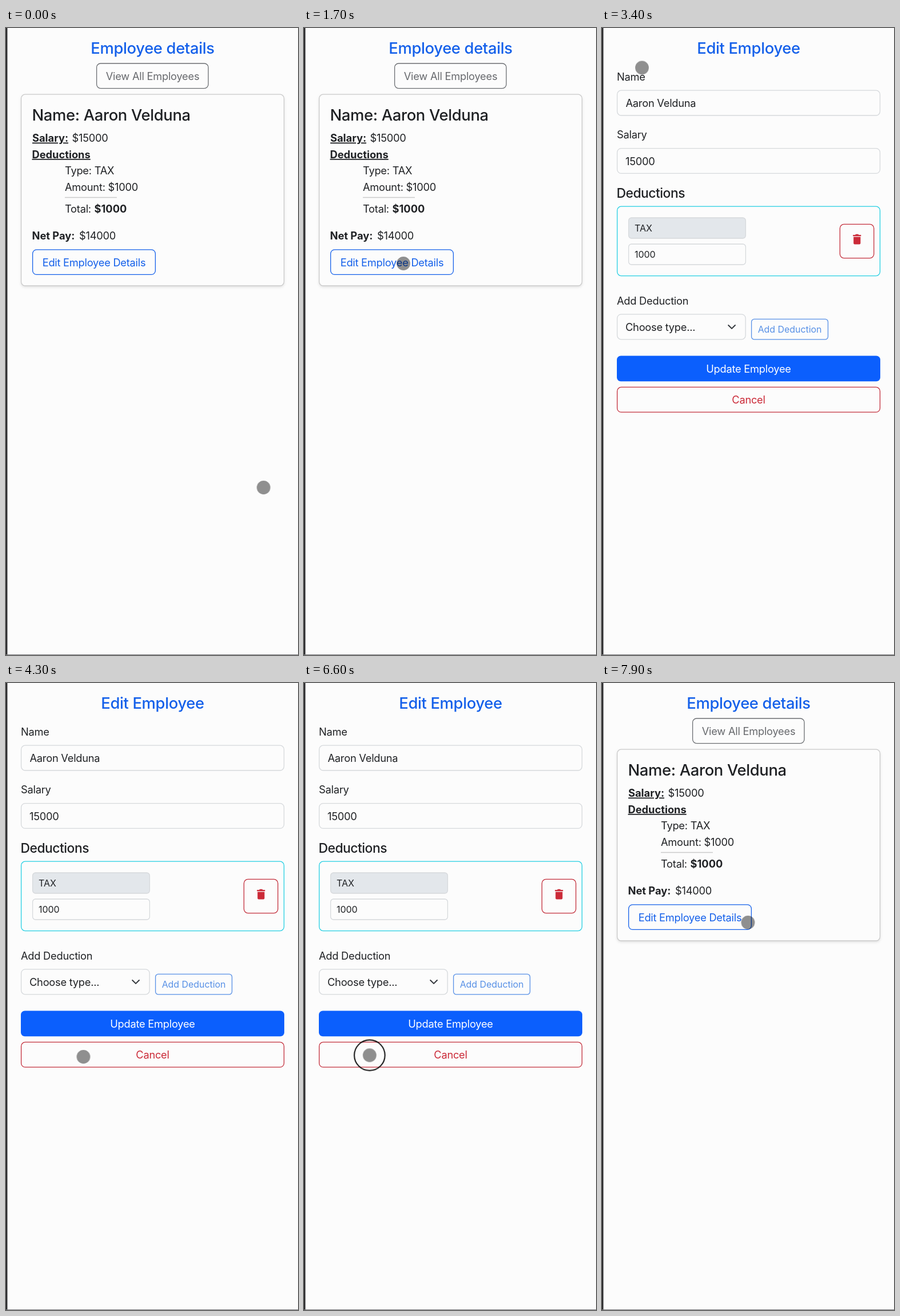
Animation of 511x1097 px, one loop 8 s. Source, as an HTML page:

```html
<!DOCTYPE html>
<html lang="en">
<head>
<meta charset="utf-8">
<title>Employee details</title>
<style>
  html, body { margin: 0; width: 100%; height: 100%; overflow: hidden; background: #fcfcfc; }
  svg { display: block; width: 100vw; height: 100vh; }
  text { font: 400 18.3px Inter, "Liberation Sans", sans-serif; letter-spacing: -.014em; fill: #1f2124; }
  rect { fill: none; stroke-width: 1.3; }
  .mid { text-anchor: middle; }
  .title { font-size: 27.4px; font-weight: 500; letter-spacing: -.013em; }
  .sub { font-size: 22.8px; font-weight: 500; letter-spacing: -.02em; }
  .bold { font-weight: 700; letter-spacing: 0; }
  .line { text-decoration: underline; }
  .small { font-size: 16px; letter-spacing: -.004em; }
  .blue { fill: #1460ea; }
  .grey { fill: #67696d; }
  .red { fill: #cb2a38; }
  .white { fill: #fff; }
  .pale { fill: #5790e6; }
  .field { stroke: #d6d9dc; }
  .off { fill: #e3e7eb; }
  .card { fill: #fcfcfc; stroke: #cacaca; filter: drop-shadow(0 2px 2px rgba(0, 0, 0, .1)); }

  .details { animation: details 8s step-end infinite; }
  .edit { animation: edit 8s step-end infinite; }
  .ring { fill: none; stroke: #000; stroke-width: 1.9; animation: press 8s step-end infinite; }
  .cursor { animation: roam 8s infinite; }

  @keyframes details {
    0%, 83.75%, 100% { visibility: visible; }
    26.25% { visibility: hidden; }
  }
  @keyframes edit {
    0%, 83.75%, 100% { visibility: hidden; }
    26.25% { visibility: visible; }
  }
  @keyframes press {
    0%, 26.25%, 83.75%, 100% { visibility: hidden; }
    23.75%, 81.25% { visibility: visible; }
  }
  /* the pointer moves ten times a second */
  @keyframes roam {
    0% { transform: translate(450.7px, 804px); animation-timing-function: steps(6); }
    7.5% { transform: translate(214px, 416px); animation-timing-function: step-end; }
    11.25% { transform: translate(214px, 416px); animation-timing-function: steps(8); }
    21.25% { transform: translate(174px, 412px); animation-timing-function: steps(3); }
    25% { transform: translate(172px, 412px); animation-timing-function: steps(6); }
    32.5% { transform: translate(110px, 180px); animation-timing-function: step-end; }
    33.75% { transform: translate(110px, 180px); animation-timing-function: steps(7); }
    42.5% { transform: translate(70px, 69.5px); animation-timing-function: steps(3); }
    46.25% { transform: translate(36px, 150px); animation-timing-function: steps(3); }
    50% { transform: translate(60px, 400px); animation-timing-function: steps(3); }
    53.75% { transform: translate(135.5px, 654px); animation-timing-function: steps(2); }
    56.25% { transform: translate(220px, 600px); animation-timing-function: steps(5); }
    62.5% { transform: translate(448px, 380px); animation-timing-function: steps(4); }
    67.5% { transform: translate(240px, 300px); animation-timing-function: steps(3); }
    71.25% { transform: translate(77.5px, 329px); animation-timing-function: step-end; }
    72.5% { transform: translate(77.5px, 329px); animation-timing-function: steps(7); }
    81.25% { transform: translate(114.8px, 651.3px); animation-timing-function: step-end; }
    83.75% { transform: translate(114.8px, 651.3px); animation-timing-function: steps(5); }
    90% { transform: translate(140px, 688px); animation-timing-function: steps(4); }
    95% { transform: translate(172px, 636px); animation-timing-function: steps(2); }
    97.5% { transform: translate(262px, 415px); animation-timing-function: steps(1); }
    98.75%, 100% { transform: translate(255.5px, 419px); animation-timing-function: step-end; }
  }
</style>
</head>
<body>
<svg viewBox="0 0 511 1097" preserveAspectRatio="none">
  <rect width="511" height="1097" style="fill:#fcfcfc"/>

  <g class="details">
    <text class="title blue mid" x="256.5" y="44.7">Employee details</text>
    <rect x="158.6" y="62" width="195.4" height="43.6" rx="7" stroke="#6b6e72"/>
    <text class="grey mid" x="256.5" y="90.5">View All Employees</text>

    <rect class="card" x="26.6" y="116.2" width="459.9" height="334.8" rx="7"/>
    <text class="title" x="45.5" y="162.3">Name: Aaron Velduna</text>
    <text class="bold line" x="46" y="199.4">Salary:</text>
    <text x="115.5" y="199.4">$15000</text>
    <text class="bold line" x="45.5" y="227.9">Deductions</text>
    <text x="103" y="256.3">Type: TAX</text>
    <text x="103" y="284.7">Amount: $1000</text>
    <path d="M103 296.5h91" stroke="#c9c9ca" stroke-width="1.3"/>
    <text x="103" y="323">Total:</text>
    <text class="bold" x="154.5" y="323">$1000</text>
    <text class="bold" x="45.5" y="370.4">Net Pay:</text>
    <text x="128" y="370.4">$14000</text>
    <rect x="46.6" y="387.8" width="214.8" height="43.6" rx="7" stroke="#1460ea"/>
    <text class="blue mid" x="154" y="416.8">Edit Employee Details</text>
  </g>

  <g class="edit">
    <text class="title blue mid" x="256.5" y="44.7">Edit Employee</text>
    <text x="26" y="92">Name</text>
    <rect class="field" x="26.6" y="109.2" width="459.9" height="43.8" rx="7"/>
    <text x="41.5" y="138">Aaron Velduna</text>
    <text x="26" y="193.3">Salary</text>
    <rect class="field" x="26.6" y="210.6" width="459.9" height="43.8" rx="7"/>
    <text x="41" y="239.6">15000</text>

    <text class="sub" x="25.5" y="297">Deductions</text>
    <rect x="26.6" y="312.2" width="459.9" height="121.4" rx="7" stroke="#25cfe3"/>
    <rect class="field off" x="46.6" y="332" width="204.8" height="36" rx="5"/>
    <text class="small" x="57" y="356">TAX</text>
    <rect class="field" x="46.6" y="378" width="204.8" height="36" rx="5"/>
    <text class="small" x="57" y="402">1000</text>
    <rect x="416.4" y="343.4" width="59.4" height="59.2" rx="7" stroke="#c32f3c"/>
    <path class="red" d="M439.2 362h3.8l1.2-1.2h4.1l1.2 1.2h3.8v2.3h-14.1zM440.2 365.6h12.2v10.9q0 2-2 2h-8.2q-2 0-2-2z"/>

    <text x="26" y="484">Add Deduction</text>
    <rect class="field" x="26.6" y="500.8" width="224.6" height="44" rx="7"/>
    <text x="41" y="529.8">Choose type...</text>
    <path d="M221.2 520l5.9 5.9 5.9-5.9" fill="none" stroke="#34383d" stroke-width="2" stroke-linecap="round" stroke-linejoin="round"/>
    <rect x="261.6" y="509.3" width="133.9" height="35.6" rx="5" stroke="#5790e6"/>
    <text class="small pale mid" x="328.5" y="533">Add Deduction</text>

    <rect x="26" y="573.5" width="461" height="44.8" rx="7" style="fill:#0b5ffd"/>
    <text class="white mid" x="256.5" y="603">Update Employee</text>
    <rect x="26.6" y="628.4" width="459.9" height="43.8" rx="7" stroke="#c32f3c"/>
    <text class="red mid" x="256.5" y="657">Cancel</text>
  </g>

  <path d="M0 0h2.4v1097h-2.4z" fill="#2b2b2d"/>
  <path d="M0 1096h511v1h-511z" fill="#77777a"/>

  <g class="cursor">
    <circle r="11.9" fill="#000" fill-opacity=".43"/>
    <circle class="ring" r="26.8"/>
  </g>
</svg>
</body>
</html>
```
